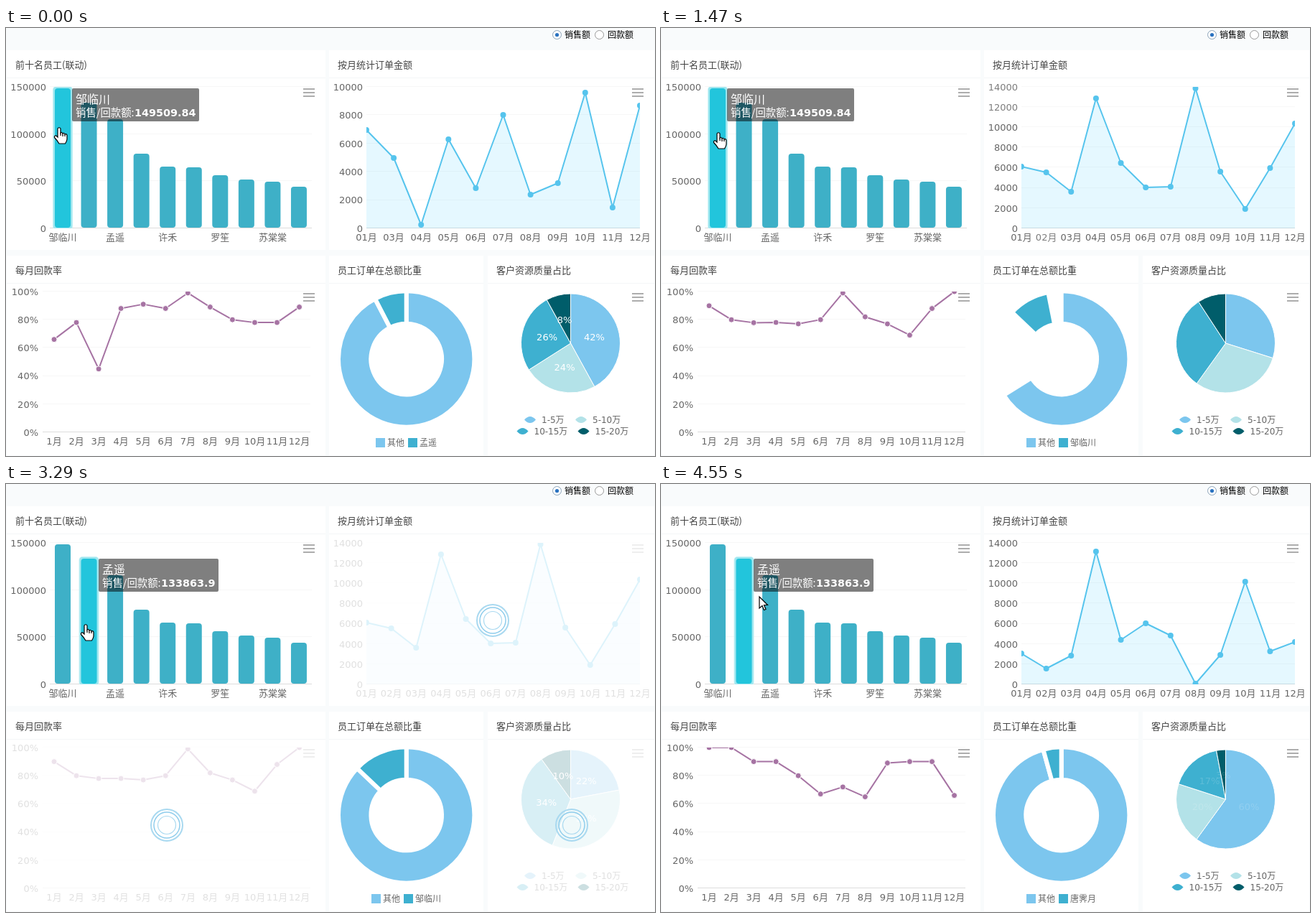
Write an HTML page with a canvas that moves like this. It is 904x596 px and loops after 4620 ms.

```html
<!DOCTYPE html>
<html lang="zh">
<head>
<meta charset="utf-8">
<style>
html, body { margin: 0; width: 100%; height: 100%; overflow: hidden; }
canvas { display: block; }
</style>
</head>
<body>
<canvas id="stage" width="904" height="596"></canvas>
<script>
const c = document.getElementById('stage').getContext('2d');
const LOOP = 4620, STEP = 70, CLICK1 = 980, CLICK2 = 3290, HOVER2 = 2400;
const FONT = '"DejaVu Sans", "Noto Sans CJK SC", "Noto Sans CJK", sans-serif';
const CJK = '"Noto Sans CJK SC", "Noto Sans CJK", sans-serif';
const BLUE = '#7cc6ee', TEAL = '#3eb0d0', LINE = '#56c4ed', PURPLE = '#a673a3';

const names = { 0: '邹临川', 2: '孟遥', 4: '许禾', 6: '罗笙', 8: '苏棠棠' };
const barTops = [84, 104, 127, 175, 193, 194, 205, 211, 214, 221];
const states = [
  { orders: [142, 181, 274, 155, 223, 121, 232, 216, 90, 250, 108],
    rates: [66, 78, 45, 88, 91, 88, 99, 89, 80, 78, 78, 89],
    share: 27.5, who: '孟遥', pie: [42, 24, 26, 8] },
  { orders: [193, 201, 228, 98, 188, 222, 221, 84, 200, 252, 195, 133],
    rates: [90, 80, 78, 78, 77, 80, 99, 82, 77, 69, 88, 100],
    share: 46.5, who: '邹临川', pie: [22, 34, 34, 10] },
  { orders: [236, 257, 239, 94, 217, 194, 211, 278, 238, 136, 233, 220],
    rates: [100, 100, 90, 90, 80, 67, 72, 65, 89, 90, 90, 66],
    share: 15.5, who: '唐霁月', pie: [60, 20, 17, 3] }
];

const clamp = v => Math.max(0, Math.min(1, v));
const lerp = (a, b, p) => a + (b - a) * p;
const expoOut = v => v <= 0 ? 0 : v >= 1 ? 1 : 1 - 2 ** (-10 * v);
const cubicOut = v => 1 - (1 - clamp(v)) ** 3;
const quadInOut = v => (v = clamp(v)) < .5 ? 2 * v * v : 1 - 2 * (1 - v) ** 2;
const rad = deg => (deg - 90) * Math.PI / 180;

function text(s, x, y, { size = 13, color = '#666', align = 'left', font = FONT, weight = '', alpha = 1 } = {}) {
  c.globalAlpha = alpha;
  c.font = `${weight} ${size}px ${font}`;
  c.fillStyle = color;
  c.textAlign = align;
  c.fillText(s, x, y + size * .37);
  c.globalAlpha = 1;
}
function rect(x, y, w, h, color) {
  c.fillStyle = color;
  c.fillRect(x, y, w, h);
}
function rounded(x, y, w, h, r, color) {
  c.beginPath();
  c.roundRect(x, y, w, h, r);
  c.fillStyle = color;
  c.fill();
}
function circle(x, y, r, fill, stroke, width = 1) {
  c.beginPath();
  c.arc(x, y, r, 0, 7);
  if (fill) { c.fillStyle = fill; c.fill(); }
  if (stroke) { c.strokeStyle = stroke; c.lineWidth = width; c.stroke(); }
}
function polyline(points, color) {
  c.beginPath();
  points.forEach(p => c.lineTo(...p));
  c.strokeStyle = color;
  c.lineWidth = 2;
  c.lineJoin = 'round';
  c.stroke();
}
function clipped(x, y, w, h, draw) {
  c.save();
  c.beginPath();
  c.rect(x, y, w, h);
  c.clip();
  draw();
  c.restore();
}
function menu(x, y) {
  for (const dy of [-5, 0, 5]) rect(x, y + dy - 1, 16, 2, '#adadad');
}
function panel(x, y, w, title) {
  rect(x, y, w, 278, '#fff');
  rect(x, y + 38, w, 1, '#f4f6f7');
  text(title, x + 12, y + 20, { color: '#444', font: CJK });
}
function loading(x, y, w, h, cx, cy) {
  rect(x, y, w, h, 'rgba(255,255,255,.8)');
  circle(cx, cy, 22, null, '#a9d9f0', 2);
  circle(cx, cy, 18, null, '#8fcdec', 1.5);
  circle(cx, cy, 12.5, null, '#a9d9f0', 1.2);
}

function drawFrameParts() {
  rect(0, 0, 904, 596, '#f9fbfc');
  panel(1, 31, 444, '前十名员工(联动)');
  panel(450, 31, 453, '按月统计订单金额');
  panel(1, 317, 444, '每月回款率');
  panel(450, 317, 215, '员工订单在总额比重');
  panel(671, 317, 232, '客户资源质量占比');
  circle(767.5, 9.5, 6, '#fff', '#8ba3b8');
  circle(767.5, 9.5, 2.6, '#2a72c0');
  circle(826.5, 9.5, 6, '#fff', '#999');
  text('销售额', 778, 10, { size: 12, color: '#000', font: CJK });
  text('回款额', 838, 10, { size: 12, color: '#000', font: CJK });
}

function drawBars(active) {
  for (let i = 0; i < 4; i++) {
    const y = 279 - i * 65.6;
    rect(61, Math.round(y) - 1, 365, 1, i ? '#f7f7f7' : '#dcdcdc');
    text(i * 50000, 56, y, { align: 'right' });
  }
  clipped(61, 82, 366, 197, () => barTops.forEach((top, i) => {
    const x = 68 + 36.55 * i;
    if (i === active) {
      rounded(x - 3, top - 3, 28, 284 - top, 5, '#c3f0f5');
      rounded(x - 2, top - 2, 26, 282 - top, 4, '#9ee6ef');
    }
    rounded(x, top, 22, 278 - top, 4, i === active ? '#22c5dc' : '#3eb0c7');
  }));
  for (const i in names) text(names[i], 79 + 36.55 * i, 291, { align: 'center' });
  menu(414, 90);
}

const monthX = (k, i) => k ? 502 + 34.64 * i : 502 + 38.1 * Math.min(i, 10);
function orderPoint(k, i) {
  return [monthX(k, i), states[k].orders[k ? i : Math.min(i, 10)]];
}
// The first state has no February, so later months sit one place earlier.
const slot = (k, m) => k || !m ? m : m - 1;

function drawOrders(from, to, p, q) {
  const mix = (a, b) => a.map((v, j) => lerp(v, b[j], p));
  const fade = to === 0 ? 0 : from === 0 ? q * .85 + (q === 1 ? .15 : 0) : 1;
  const maxOf = k => k ? 14000 : 10000;
  for (let v = 0; v <= 14000; v += 2000) {
    const extra = v > 10000, alpha = extra ? fade : 1;
    if (!alpha) continue;
    const yOf = k => 279 - 197 * v / maxOf(k);
    const y = extra ? yOf(1) : lerp(yOf(from), yOf(to), q);
    c.globalAlpha = alpha;
    rect(502, Math.round(y) - 1, 381, 1, v ? '#f7f7f7' : '#dcdcdc');
    text(v, 497, y, { align: 'right', alpha });
  }
  const months = [...Array(12).keys()];
  const line = months.map(i => mix(orderPoint(from, i), orderPoint(to, i)));
  const area = line.slice();
  if (from === 0) area[11] = to ? mix([883, 279], orderPoint(to, 11)) : [883, 279];
  clipped(502, 82, 381, 197, () => {
    c.beginPath();
    [...area, [883, 279], [502, 279]].forEach(pt => c.lineTo(...pt));
    c.fillStyle = 'rgba(75,205,250,.14)';
    c.fill();
    polyline(line, LINE);
    for (const m of months) {
      if (m === 1 && from === 0 && (to === 0 || p < 1)) continue;
      circle(...mix(orderPoint(from, slot(from, m)), orderPoint(to, slot(to, m))), 4, LINE);
    }
  });
  for (const m of months) {
    const alpha = m === 1 ? fade : 1;
    const x = m === 1 ? monthX(1, 1) : lerp(monthX(from, slot(from, m)), monthX(to, slot(to, m)), q);
    if (alpha) text(String(m + 1).padStart(2, '0') + '月', x, 291, { align: 'center', alpha });
  }
  menu(872, 90);
}

function drawRates(a, b, q) {
  for (let i = 0; i < 6; i++) {
    const y = 563 - 39.2 * i;
    rect(51, Math.round(y) - 1, 373, 1, i ? '#f7f7f7' : '#dcdcdc');
    text(i * 20 + '%', 45, y, { align: 'right' });
  }
  const points = a.rates.map((v, i) => [67 + 31.05 * i, 563 - 1.96 * lerp(v, b.rates[i], q)]);
  menu(414, 375);
  clipped(51, 367, 374, 196, () => {
    polyline(points, PURPLE);
    points.forEach(pt => circle(...pt, 4, PURPLE, '#fff', 1));
  });
  points.forEach(([x], i) => text(i + 1 + '月', x, 575, { align: 'center' }));
}

function sector(x, y, inner, outer, start, sweep, color, border) {
  if (sweep < .1) return;
  c.beginPath();
  c.arc(x, y, outer, rad(start), rad(start + sweep));
  if (inner) c.arc(x, y, inner, rad(start + sweep), rad(start), true);
  else c.lineTo(x, y);
  c.closePath();
  c.fillStyle = color;
  c.fill();
  c.strokeStyle = '#fff';
  c.lineWidth = border;
  c.stroke();
}

function drawDonut({ share, who }, p) {
  sector(557.7, 461, 49.3, 94.7, 0, (360 - share) * p, BLUE, 6);
  sector(557.7, 461, 49.3, 94.7, -share, share * p, TEAL, 6);
  const x = who.length < 3 ? 515 : 509;
  rect(x, 571, 13, 13, BLUE);
  rect(x + 45, 571, 13, 13, TEAL);
  text('其他', x + 16, 577.5, { size: 12 });
  text(who, x + 61, 577.5, { size: 12 });
}

const pieColors = [BLUE, '#b3e2e8', TEAL, '#005d6a'];
const pieLegend = [['1-5万', 730, 545.5], ['5-10万', 801, 545.5], ['10-15万', 719.5, 561.5], ['15-20万', 804.5, 561.5]];

function drawPie(a, b, p, labels, alpha) {
  let start = 0;
  pieColors.forEach((color, i) => {
    const sweep = lerp(a.pie[i], b.pie[i], p) * 3.6;
    sector(786.5, 439, 0, 69, start, sweep, color, 1);
    start += sweep;
  });
  start = 0;
  labels.pie.forEach(v => {
    const mid = rad((start + v / 2) * 3.6);
    start += v;
    if (alpha) text(v + '%', 786.5 + 34 * Math.cos(mid), 439 + 34 * Math.sin(mid), { color: '#fff', align: 'center', alpha });
  });
  pieLegend.forEach(([label, x, y], i) => {
    c.beginPath();
    c.moveTo(x - 8, y);
    c.quadraticCurveTo(x, y - 9, x + 8, y);
    c.quadraticCurveTo(x + 4, y + 4.5, x, y + 4.5);
    c.quadraticCurveTo(x - 4, y + 4.5, x - 8, y);
    c.fillStyle = pieColors[i];
    c.fill();
    text(label, x + 16, y, { size: 12 });
  });
  menu(872, 375);
}

function drawTooltip(t) {
  const second = t >= HOVER2, p = cubicOut((t - HOVER2) / 560);
  const x = lerp(92, 129, p), y = lerp(84, 104, p);
  const white = { color: '#fff', size: 14.4 };
  rounded(x, y, second ? 167 : 177, 46, 2, 'rgba(0,0,0,.5)');
  text(second ? names[2] : names[0], x + 5, y + 15, { ...white, size: 16, font: CJK });
  text('销售/回款额:', x + 5, y + 33.5, { ...white, font: CJK });
  text(second ? '133863.9' : '149509.84', x + 87, y + 33.5, { ...white, weight: 'bold' });
}

const hand = new Path2D('M-2,1Q0,-1.5 2,1V7Q4,5.5 5,8Q7,6.5 8,9Q10.5,8 11,10.5V16Q10.5,19 8.5,22H0Q-3,17 -6.5,13.5Q-7,10.5 -4,11L-2,13Z');
const knuckles = new Path2D('M2,7V11M5,8V12M8,9V12');
const arrow = new Path2D('M0,0V16L4,12.5L6.5,18.5L9,17.5L6.5,11.5H11.5Z');
const moves = [[70, 280, 80, 146], [2170, 2520, 111, 196], [4200, 4550, 137, 157]];

function drawCursor(t) {
  let x = 74, y = 139;
  for (const [t0, t1, tx, ty] of moves) {
    const p = clamp((t - t0) / (t1 - t0));
    x = lerp(x, tx, p);
    y = lerp(y, ty, p);
  }
  const onGap = x > 127;
  c.save();
  c.translate(x, y);
  c.fillStyle = '#fff';
  c.strokeStyle = '#000';
  c.lineWidth = 1.2;
  c.fill(onGap ? arrow : hand);
  c.stroke(onGap ? arrow : hand);
  if (!onGap) c.stroke(knuckles);
  c.restore();
}

function draw(t) {
  const to = t < CLICK1 ? 0 : t < CLICK2 ? 1 : 2;
  const from = Math.max(0, to - 1);
  const a = states[from], b = states[to];
  const age = to ? t - (to === 1 ? CLICK1 : CLICK2) : 1e4;
  const slow = expoOut((age - 140) / 440);

  drawFrameParts();
  drawBars(t < HOVER2 ? 0 : 1);
  drawOrders(from, to, expoOut((age - 70) / 420), slow);
  drawRates(a, b, slow);
  if (age < 20) drawDonut(a, 1);
  else drawDonut(b, quadInOut((age - 20) / 720));
  const waiting = age < 100;
  drawPie(a, b, quadInOut((age - 100) / 700), waiting ? a : b, waiting ? 1 : clamp((age - 1220) / 250));

  if (age < 70) loading(450, 70, 453, 239, 678, 190);
  if (age < 100) loading(671, 356, 232, 239, 788, 475);
  if (age < 140) loading(1, 356, 444, 239, 224, 475);
  drawTooltip(t);
  drawCursor(t);
}

const begin = performance.now();
function tick() {
  const t = (performance.now() - begin) % LOOP;
  draw(Math.floor(t / STEP) * STEP);
  requestAnimationFrame(tick);
}
tick();
</script>
</body>
</html>
```
